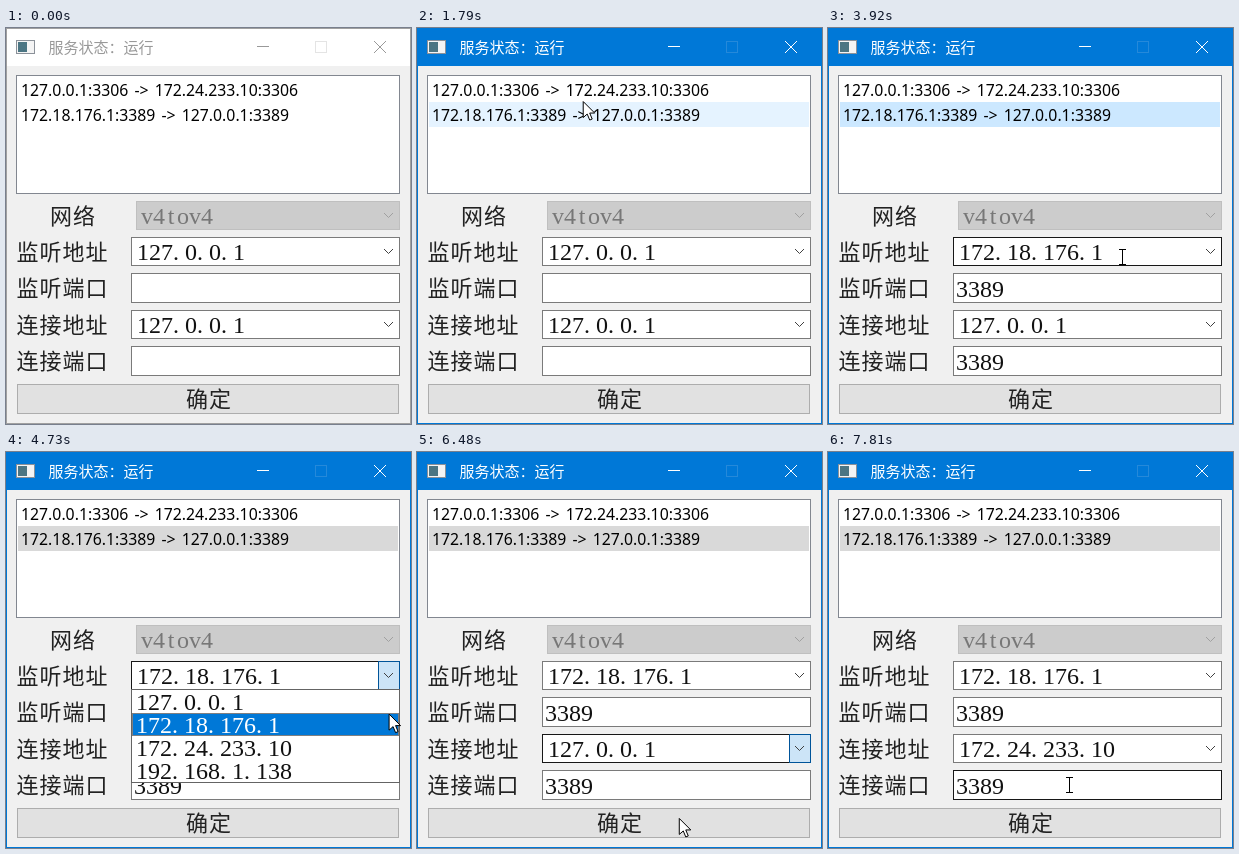
An HTML page with a canvas that plays this animation: 405x396 px, repeating every 8000 ms.

```html
<!DOCTYPE html>
<html lang="zh">
<head>
<meta charset="utf-8">
<style>
html, body { margin: 0; width: 100%; height: 100%; overflow: hidden; }
canvas { display: block; }
</style>
</head>
<body>
<canvas id="stage" width="405" height="396"></canvas>
<script>
const ctx = document.getElementById('stage').getContext('2d');
const W = 405, H = 396, LOOP = 8000;
const CJK = '"Noto Sans CJK SC", "Noto Sans CJK", sans-serif';
const HOSTS = ['127.0.0.1', '172.18.176.1', '172.24.233.10', '192.168.1.138'];
const ROWS = ['127.0.0.1:3306 -> 172.24.233.10:3306', '172.18.176.1:3389 -> 127.0.0.1:3389'];
const LABELS = ['监听地址', '监听端口', '连接地址', '连接端口'];
const ROW = 25, ITEM = 23, CELL = 12, BLINK = 530;

// Moments at which the user acts
const ACTIVATE = 880, PICK_ROW = 3140, FILL = 3330, OPEN_LISTEN = 4150,
  CLOSE_LISTEN = 4880, OPEN_CONNECT = 5230, CLOSE_CONNECT = 6480, UPDATE = 6530;

// Pointer stops: time, x, y
const PATH = [
  [120, W, 130], [ACTIVATE, 250, 14], [1120, 245, 44], [2080, 133, 87],
  [2400, 133, 87], [2540, 189, 87], [3600, 189, 87], [3920, 294, 229],
  [OPEN_LISTEN, 382, 226], [CLOSE_LISTEN, 384, 272], [OPEN_CONNECT, 382, 297], [5360, 357, 309],
  [5930, 263, 367], [CLOSE_CONNECT, 263, 367], [7250, 90, 330], [7810, 241, 333]
];
const ARROW = new Path2D('M0 0v16l4-3.5 2.5 6 2.5-1-2.5-6h5z');
const BEAM = new Path2D('M-3 -7.5h7M.5 -8v16M-3 7.5h7');

const during = (t, from, to) => t >= from && t < to;
const within = (p, r) => p.x >= r.x && p.x < r.x + r.w && p.y >= r.y && p.y < r.y + r.h;
const fieldRect = i => ({ x: 125, y: Math.round(209 + i * 36.4), w: 269, h: 29 + i % 2 });
const button = { x: 11, y: 356, w: 382, h: 30 };

function pointerAt(t) {
  const next = PATH.findIndex(stop => stop[0] > t);
  if (next === 0) return { x: W + 50, y: 130 };
  const [t1, x1, y1] = PATH.at(next);
  if (next < 0) return { x: x1, y: y1 };
  const [t0, x0, y0] = PATH[next - 1];
  const k = (t - t0) / (t1 - t0);
  return { x: x0 + (x1 - x0) * k, y: y0 + (y1 - y0) * k };
}

function fill(x, y, w, h, color) {
  ctx.fillStyle = color;
  ctx.fillRect(x, y, w, h);
}

function outline(x, y, w, h, color) {
  ctx.strokeStyle = color;
  ctx.strokeRect(x + .5, y + .5, w - 1, h - 1);
}

function box({ x, y, w, h }, color, border) {
  fill(x, y, w, h, color);
  outline(x, y, w, h, border);
}

function line(color, ...points) {
  ctx.strokeStyle = color;
  ctx.beginPath();
  points.forEach(p => ctx.lineTo(...p));
  ctx.stroke();
}

function text(str, x, y, font, color, letter = 0, word = 0) {
  ctx.font = font;
  ctx.letterSpacing = letter + 'px';
  ctx.wordSpacing = word + 'px';
  ctx.fillStyle = color;
  ctx.fillText(str, x, y);
}

const label = (str, x, middle) => text(str, x, middle + 8, '300 22px ' + CJK, '#222', 1);
const chevron = (y, color) => line(color, [378, y - 2], [382.5, y + 2.5], [387, y - 2]);

// Half-width characters sit on a fixed grid: letters centred, dots to the left
function cells(str, x, y, color = '#111') {
  [...str].forEach((c, i) => {
    ctx.textAlign = c === '.' ? 'left' : 'center';
    const dx = c === '.' ? 0 : CELL / 2;
    text(c, x + i * CELL + dx, y, '24px "Liberation Serif", serif', color);
  });
  ctx.textAlign = 'left';
}

function titleBar(active) {
  const ink = active ? '#fff' : '#999';
  fill(0, 0, W, 38, active ? '#0078d7' : '#fff');
  box({ x: 10, y: 12, w: 19, h: 14 }, '#f4f4f4', '#8b9199');
  fill(12, 14, 9, 10, '#4b7583');
  text('服务状态：运行', 42.5, 25, '15px ' + CJK, ink);
  line(ink, [251, 18.5], [263, 18.5]);
  outline(309, 13, 12, 12, active ? '#2589da' : '#e4e4e4');
  line(ink, [368, 13], [380, 25]);
  line(ink, [380, 13], [368, 25]);
}

function list(t, p, hover) {
  box({ x: 10, y: 47, w: 384, h: 119 }, '#fff', '#828790');
  ROWS.forEach((row, i) => {
    const r = { x: 12, y: 49 + i * ROW, w: 380, h: ROW };
    let color = hover && within(p, r) ? '#e5f3ff' : '#fff';
    if (i === 1 && t >= PICK_ROW) color = t < OPEN_LISTEN ? '#cce8ff' : '#d9d9d9';
    fill(r.x, r.y, r.w, r.h, color);
    text(row, 15, r.y + 19, '15.8px "Noto Sans", sans-serif', '#000', 0, 2);
  });
}

function field(i, str, p, pressed, hover) {
  const r = fieldRect(i), isCombo = i % 2 === 0;
  const hot = hover && within(p, r);
  label(LABELS[i], 10.5, r.y + 15);
  box(r, '#fff', hot || pressed ? '#171717' : '#7a7a7a');
  cells(str, isCombo ? 131 : 128, r.y + (isCombo ? 23 : 24));
  if (!isCombo) return;
  const arrow = { ...r, x: 372, w: 22 };
  if (pressed) box(arrow, '#cce4f7', '#005499');
  else if (hot && within(p, arrow)) box(arrow, '#e5f1fb', '#0078d7');
  chevron(r.y + 14, '#404040');
}

function popup(fieldIndex, current, p) {
  const { x, y, w, h } = fieldRect(fieldIndex), top = y + h;
  box({ x, y: top - 1, w, h: ITEM * HOSTS.length + 2 }, '#fff', '#646464');
  const over = Math.floor((p.y - top) / ITEM);
  const chosen = over >= 0 ? over : current;
  HOSTS.forEach((host, i) => {
    const itemTop = top + i * ITEM;
    if (i === chosen) {
      fill(x + 1, itemTop, w - 2, ITEM, '#0078d7');
      ctx.setLineDash([1, 1]);
      ctx.lineDashOffset = 1;
      outline(x + 1, itemTop, w - 2, ITEM, '#ff8728');
      ctx.setLineDash([]);
    }
    cells(host, x + 5, itemTop + 20, i === chosen ? '#fff' : '#111');
  });
}

function pointer({ x, y }, editing) {
  ctx.save();
  ctx.strokeStyle = '#000';
  ctx.fillStyle = '#fff';
  if (editing) {
    ctx.translate(Math.round(x), Math.round(y));
    ctx.stroke(BEAM);
  } else {
    ctx.translate(x - .5, y - .5);
    ctx.fill(ARROW);
    ctx.stroke(ARROW);
  }
  ctx.restore();
}

function draw(t) {
  const p = pointerAt(t);
  const active = t >= ACTIVATE;
  const listenOpen = during(t, OPEN_LISTEN, CLOSE_LISTEN);
  const connectOpen = during(t, OPEN_CONNECT, CLOSE_CONNECT);
  const connectPressed = during(t, OPEN_CONNECT, UPDATE);
  const hover = active && !listenOpen && !connectPressed;
  const filled = t >= FILL;
  const port = filled ? '3389' : '';

  fill(0, 0, W, H, '#f0f0f0');
  titleBar(active);
  outline(0, 0, W, H, active ? '#0078d7' : '#a0a0a0');
  list(t, p, hover);

  label('网络', 44, 188);
  box({ x: 130, y: 173, w: 264, h: 29 }, '#ccc', '#bfbfbf');
  cells('v4tov4', 135, 196, '#777');
  chevron(187, '#a0a0a0');

  const values = [HOSTS[filled ? 1 : 0], port, HOSTS[t < UPDATE ? 0 : 2], port];
  const pressed = [listenOpen, false, connectPressed, false];
  values.forEach((value, i) => field(i, value, p, pressed[i], hover));

  const onButton = hover && within(p, button);
  box(button, onButton ? '#e5f1fb' : '#e1e1e1', onButton ? '#0078d7' : '#adadad');
  label('确定', 180, 371);

  const caretOn = Math.floor((t - ACTIVATE) / BLINK) % 2 === 0;
  if (caretOn && during(t, ACTIVATE, PICK_ROW)) fill(238, 213, 1, 22, '#000');
  if (listenOpen) popup(0, 1, p);
  if (connectOpen) popup(2, 0, p);

  const overText = values.some((_, i) => within(p, { ...fieldRect(i), w: i % 2 ? 269 : 247 }));
  pointer(p, overText && hover);
}

function tick(now) {
  draw(now % LOOP);
  requestAnimationFrame(tick);
}
requestAnimationFrame(tick);
</script>
</body>
</html>
```
